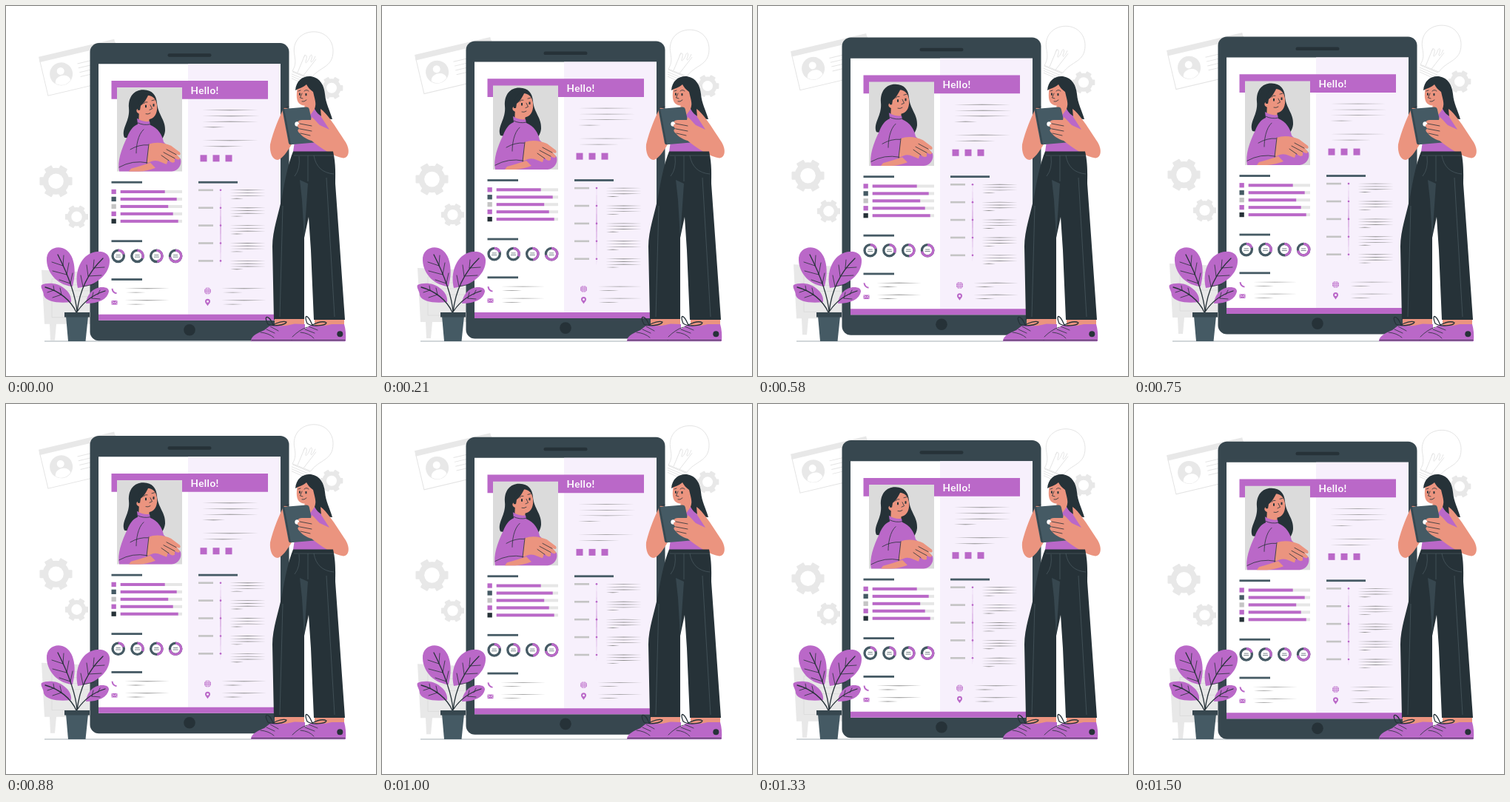
An HTML page for the animation above (1.54 s loop, 500 by 500 pixels).

```html
<!DOCTYPE html>
<html lang="en">
<head>
<meta charset="utf-8">
<title>Floating résumé</title>
<style>
  html, body { margin: 0; width: 100%; height: 100%; overflow: hidden; background: #fff; }
  svg { display: block; width: 100%; height: 100%; }
  .purple { fill: #ba68c8; }
  .skin { fill: #eb947f; }
  .dark { fill: #263238; }
  .slate { fill: #37474f; }
  .steel { fill: #455a64; }
  .pale { fill: #e8e8e8; }
  .ink { fill: none; stroke: #263238; stroke-width: .8; stroke-linecap: round; stroke-linejoin: round; }
  .bold { stroke-width: 1.3; }
  .ghost { fill: none; stroke: #e4e4e4; stroke-width: 1; }
  .rule { fill: #8c8c8c; }
  .seam { fill: none; stroke: #52636b; stroke-width: .6; }
</style>
</head>
<body>
<svg viewBox="0 0 500 500">
  <g id="floating">
    <!-- desk -->
    <path class="pale" d="M48 357 114 360V430H52ZM59 430h9l-2 22h-6z"/>
    <path d="M62 369H114M62 369V421H114M67 377H112M67 385H112M67 393H112" fill="none" stroke="#dadada" stroke-width=".8"/>

    <!-- id card -->
    <g transform="translate(44 69) rotate(-13.3)">
      <path class="ghost" d="M.5 4V54H105V4"/>
      <path class="pale" d="M0 0H105V7.500H0Z"/>
      <circle class="pale" cx="24.500" cy="29.500" r="15.500"/>
      <circle cx="24.500" cy="25.500" r="5" fill="#fff"/>
      <path d="M14 40C15 29 34 29 35 40 29 46 20 46 14 40Z" fill="#fff"/>
      <path class="ghost" d="M49 21H80M49 27H80M49 33H80M49 39H80"/>
    </g>

    <!-- bulb -->
    <g class="ghost">
      <path d="M387 88C392 80 391 74 390 67 386 48 399 35 416 35 432 35 442 47 442 61 442 84 423 82 412 98Z"/>
      <path d="M394 90 404 66M402 94 419 72M402 70C405 64 408 67 405 75 404 80 409 74 411 68 413 64 415 68 412 74 412 79 416 73 418 68"/>
      <path d="M387 89 411 99M386 92 410 102M386 95 409 105M386 98 406 107"/>
    </g>
    <g id="gears"></g>

    <!-- tablet -->
    <rect class="slate" x="113.500" y="50.300" width="269" height="402.200" rx="12"/>
    <rect class="dark" x="218.500" y="64.500" width="59" height="4.500" rx="2.200"/>
    <circle class="dark" cx="248" cy="438" r="7.800"/>
    <path d="M125 78.500H371V425H125Z" fill="#fff"/>
    <path d="M246 78.500H371V418H246Z" fill="#f7f0fc"/>
    <path class="purple" d="M125 417H371V425H125ZM142.500 101.200H354V126H142.500Z"/>
    <text x="249.500" y="118.900" fill="#fff" font-family="Lato, sans-serif" font-weight="700" font-size="13.500" letter-spacing=".45">Hello!</text>

    <!-- portrait -->
    <path d="M150 110.300H238V223.800H150Z" fill="#dbdbdb"/>
    <path class="dark" d="M166 138C165 122 174 113 186 113.500 198 114 203 121 204 131 205 147 216 154 215 169 214 178 209 183 204 186L160 178C155 166 168 156 166 138Z"/>
    <path class="skin" d="M180 140 194 148 193 162H179Z"/>
    <path class="skin" d="M180 139C175 138 175 145 181 146 184 152 190 154 195 153 202 151 205 143 204 134 203 126 198 121 191 121 184 122 180 130 180 139Z"/>
    <path class="dark" d="M178 141C177 127 183 120 193 119 189 128 185 133 182 135L181 141Z"/>
    <path class="ink" d="M195 134 197.500 139 194 140.500M189 146Q192 147 195 145M186 132Q188 129 191 130M197 128 201 127"/>
    <path class="dark" d="M188 134h2v3.500h-2zM198.500 132.500h2v3.500h-2z"/>
    <path class="purple" d="M177 152C183 156 189 157 194 156L195 161C206 166 211 174 213 184L236 207C238 215 233 223 224 223.800H153C150 211 156 193 164 177 167 169 171 163 178 160Z"/>
    <path class="skin" d="M169 220C179 217 187 215 195 212L202 219C194 222 186 223.800 180 223.800H166ZM193 187C202 183 215 185 223 189L235 198C237 202 234 203 230 200L235 206C235 209 231 208 228 206L228 211C225 213 222 211 219 208L217 214C211 212 204 207 197 210L190 213Z"/>
    <path class="ink" d="M178 158Q186 162 195 160M186 167C178 174 176 190 176 199M168 194Q180 187 192 188M153 218Q171 208 191 212M193 187 190 213M217 194 230 201M213 198 228 206M210 202 220 209"/>

    <g id="content"></g>
    <path class="purple" d="M290 246 290.400 300 290 355 289.600 300Z"/>

    <!-- contact icons -->
    <path d="M143.500 382Q144 387.500 149.500 388.500" fill="none" stroke="#ba68c8" stroke-width="2"/>
    <path class="purple" d="M142.500 398.200h8v5.600h-8z"/>
    <path d="M142.500 398.500l4 3 4-3M142.500 403.500l2.700-3M150.500 403.500l-2.700-3" fill="none" stroke="#fff" stroke-width=".6"/>
    <circle class="purple" cx="272.500" cy="385.300" r="4.500"/>
    <g fill="none" stroke="#f7f0fc" stroke-width=".6">
      <path d="M268 385.300h9M272.500 381v9M269 383h7M269 387.600h7"/>
      <ellipse cx="272.500" cy="385.300" rx="2.200" ry="4.300"/>
    </g>
    <path class="purple" d="M272.500 405.500C270 402 269 401 269 399.500a3.500 3.500 0 0 1 7 0C276 401 275 402 272.500 405.500Z"/>
    <circle cx="272.500" cy="399.500" r="1.500" fill="#f7f0fc"/>
  </g>

  <path d="M52 453H458" stroke="#455a64" stroke-width=".5"/>

  <!-- plant -->
  <g class="purple">
    <path d="M90 379C73 378 56 364 55 344 54 330 66 324 76 327 90 331 97 352 90 379Z"/>
    <path d="M97 381C92 361 100 340 115 334 128 329 139 333 140 343 141 362 122 378 97 381Z"/>
    <path d="M88 400C72 402 54 400 51 391 51 385 46 381 48 377 56 373 70 374 78 381 85 386 89 393 88 400Z"/>
    <path d="M108 402C109 390 118 380 130 380 136 380 139 382 139 386 137 396 126 402 108 402Z"/>
  </g>
  <path class="ink bold" d="M96 414C95 395 85 365 70 336M96 414C99 387 110 361 131 341M95 414C88 398 72 385 53 380M97 412C105 400 118 390 134 385"/>
  <path class="ink" d="M77 351 78 337M77 351 62 346M82 363 85 347M82 363 63 358M87 375 90 361M87 375 72 370M118 354 119 343M118 354 133 353M111 365 109 350M111 365 129 364M104 379 101 364M104 379 119 376M65 384 64 378M65 384 56 387M75 390 73 381M75 390 63 394M116 395 118 387M116 395 127 396M124 390 127 384"/>
  <path class="steel" d="M81 419H111L107.500 453H84Z"/>
  <path class="slate" d="M79 414H113V420.500H79Z"/>

  <!-- standing woman -->
  <path class="skin" d="M404 128 418 125 419 142 429 149 415 161 402 157Z"/>
  <path class="purple" d="M418 138 426 144 437 159 442 197H388L390 183 416 181 407 153Z"/>
  <path class="skin" d="M376 137C370 148 361 169 357 187 356 198 360 208 367 208 373 207 380 197 386 187L382 139Z"/>
  <path class="skin" d="M394 109C392 120 392 130 398 133 405 137 413 133 416 127 421 124 421 117 416 115L408 104Z"/>
  <path class="dark" d="M391 114C392 100 402 94 412 95 425 97 430 108 431 119 432 132 438 142 441 153 432 153 422 149 417 139 420 132 417 125 415 116 411 113 408 110 406 106 402 110 396 111 391 114Z"/>
  <path class="ink" d="M400 118 397.500 124 401 125M400 129Q403 130 406 127M395 115 398 114M403 115Q406 112 409 115"/>
  <path class="dark" d="M396 117.500h1.800v3.300h-1.800zM404.500 118h1.900v3.300h-1.900z"/>
  <path class="steel" d="M375.500 139 406 136.500Q409 136.300 409.700 139L419 181.500Q419.500 184 417 184.400L385 187.300Q382.500 187.500 381.800 185L373.700 142Q373.300 139.300 375.500 139Z"/>
  <path d="M375 139 384 187" fill="none" stroke="#37474f" stroke-width="2"/>
  <circle cx="393.500" cy="159.500" r="3.200" fill="#fff"/>
  <path class="skin" d="M425 139C434 145 446 164 459 184 465 194 464 205 456 205.500 444 204 426 193 413 182 406 180 400 176 397 172 393 169 394 166 397 166 393 163 393 160 397 159 393 157 395 154 400 154H412L413 150C416 152 420 157 424 161L437 167 426 150Z"/>
  <path class="ink" d="M397 159 413 162M397 166 413 169M398 172 411 175M375 138 382 136"/>
  <path class="dark" d="M388 196.500H442C446 214 445 230 445 240L450 310 458 424H416L412 330 409 285 403 313V424H362L360 325C360 303 369 279 373 258 377 235 381 214 388 196.500Z"/>
  <path class="slate" d="M397 235 408 240 403 313 400 262Z"/>
  <path class="seam" d="M389 202H443M396 203Q398 220 390 230M416 202Q420 225 443 227M374 270 370 420M433 232 444 420M408 202V237"/>
  <path class="skin" d="M363 423H403V433H363ZM417 424H457V434H417Z"/>
  <path class="purple" d="M331 452C332 445 342 441 349 438L358 431Q374 434 390 429.500L404 430V453H331Z"/>
  <path class="purple" d="M385 452C386 445 396 441 403 437L412 431Q427 434 440 430H457Q460 440 459 453H385Z"/>
  <path class="ink" d="M332 451.500H386M386 451.500H458M344 441Q355 442 362 448M387 447Q397 437 407 434M398 441Q410 442 416 449M352 437 363 442M357 433 368 439M404 437 417 442M409 433 421 438"/>
  <path class="ink bold" d="M361 431C355 416 347 418 354 430 360 434 378 431 379 427 375 425 366 428 361 431ZM414 431C407 415 402 417 407 429 414 434 432 432 433 428 428 425 420 428 414 431Z"/>
  <circle class="dark" cx="451.300" cy="443.300" r="4"/>
</svg>

<script>
const PERIOD = 1540, FPS = 24, PEAK = 710;
const byId = id => document.getElementById(id);
const colors = { purple: '#ba68c8', steel: '#455a64', grey: '#c4c4c4', dark: '#263238', track: '#e6e6e6' };

const rect = (x, y, w, h, fill) => `<rect x="${x}" y="${y}" width="${w}" height="${h}" fill="${fill}"/>`;
const dot = (x, y, r, fill) => `<circle cx="${x}" cy="${y}" r="${r}" fill="${fill}"/>`;
// A text line that thins out towards both ends
const rule = (x, y, w) => `<path class="rule" d="M${x} ${y}q${w / 2}-.9 ${w} 0q${-w / 2} .9 ${-w} 0"/>`;

function gear(x, y, radius, hole) {
  const tooth = radius * .5;
  let teeth = '';
  for (let angle = 30; angle < 180; angle += 60) {
    teeth += `<rect x="${-tooth / 2}" y="${-radius}" width="${tooth}" height="${2 * radius}" rx="1" transform="rotate(${angle})"/>`;
  }
  return `<g class="pale" transform="translate(${x} ${y})">${teeth}<circle r="${radius * .82}"/>${dot(0, 0, hole, '#fff')}</g>`;
}

function donut(x, share) {
  const ring = (color, dash) =>
    `<circle r="7.700" pathLength="100" stroke="${color}" stroke-dasharray="${dash} 100" transform="rotate(-90)"/>`;
  return `<g transform="translate(${x} 338)" fill="none" stroke-width="3.300">
    ${ring(colors.steel, 100)}${ring(colors.purple, share)}
    <path d="M-3-1.200h6M-3.500 1.300h7" stroke="#66757c" stroke-width=".9"/></g>`;
}

byId('gears').innerHTML = gear(67.5, 237, 22, 10.3) + gear(95.5, 285, 15.6, 7.2) + gear(440, 111, 15.3, 7);

let content = '';
for (const [x, y, w] of [[142.5, 237, 41.5], [260, 237, 53], [142.5, 316.5, 41.5], [142.5, 368.3, 41.5]])
  content += rect(x, y, w, 2.8, colors.steel);

for (const [y, w] of [[141, 76], [149, 78], [156.5, 76], [164, 31], [182, 76], [190, 56]])
  content += rule(265, y, w);

for (const x of [262.5, 279.5, 296.5]) content += rect(x, 201.5, 9, 9, colors.purple);

const skills = [['purple', 60], ['steel', 76], ['grey', 64.5], ['purple', 71], ['dark', 78]];
skills.forEach(([color, width], i) => {
  const y = 248 + i * 9.95;
  content += rect(142.5, y, 6.3, 6.3, colors[color])
    + rect(154.7, y + 1.2, 83.3, 4, colors.track)
    + rect(154.7, y + 1.2, width, 4, colors.purple);
});

[20, 32, 48, 72].forEach((share, i) => content += donut(151.7 + i * 25.8, share));

for (let i = 0; i < 5; i++) {
  const y = 249 + i * 23.9;
  content += rect(260, y - 1.3, 20, 2.6, colors.grey) + dot(290, y, 1.3, colors.purple);
  for (let k = 0; k < 3; k++) content += rule(302, y + k * 3.8, 49);
  content += rule(303, y + 11.4, 18);
}

for (const x of [160, 291])
  for (const y of [382, 398]) content += rule(x, y, 61) + rule(x + 2, y + 5.3, 27);

byId('content').innerHTML = content;

function draw(now) {
  const step = Math.floor((now % PERIOD + 4.9) * FPS / 1000) % 37;
  const gap = Math.abs(step * 1000 / FPS - PEAK);
  const lift = Math.min(gap, PERIOD - gap) / 77 - 9.4;
  byId('floating').setAttribute('transform', `translate(0 ${lift.toFixed(2)})`);
  requestAnimationFrame(draw);
}
draw(0);
</script>
</body>
</html>
```
